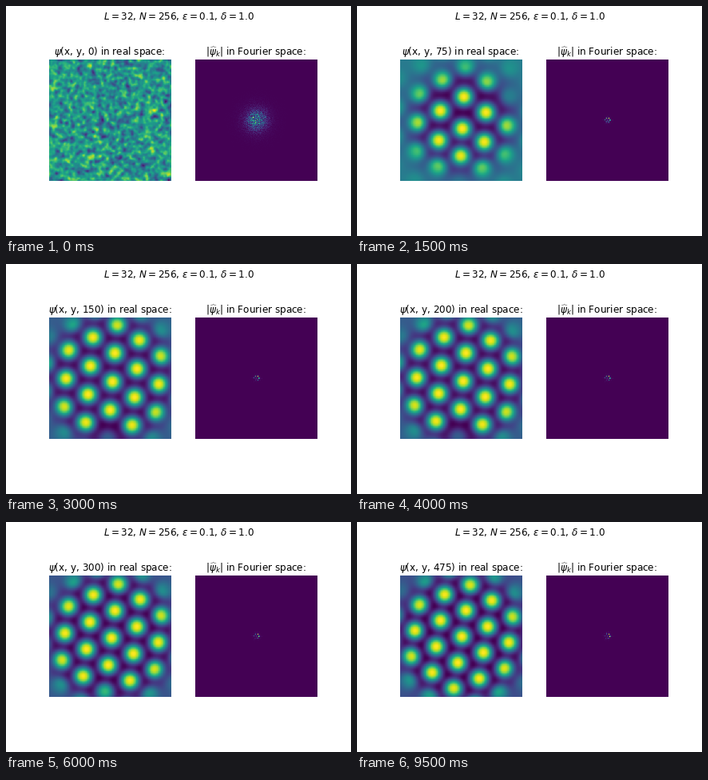
A matplotlib script for the animation above (10000 ms loop, 432x288 px).

```python
import numpy as np
import matplotlib.pyplot as plt
from matplotlib.animation import FuncAnimation

N, FRAMES, INTERVAL, STEP = 256, 20, 500, 25
LEFT, TOP, SIDE = 54.0, 67.0, 152.2          # real-space panel in stage pixels
SPOT_WIDTH = 12.2

grid = (np.arange(N) + 0.5) * SIDE / N
X, Y = np.meshgrid(LEFT + grid, TOP + grid)
R = np.hypot(X - 131, Y - 145)
mode = np.fft.fftfreq(N, 1 / N)
Q = np.hypot(*np.meshgrid(mode, mode))
taper = np.sqrt(np.sin(np.pi * grid / SIDE))
window = np.outer(taper, taper)

# The crystal passes four stages: linear growth, saturation, ordering, rest.
STAGE_TIMES = [50, 100, 150, 250, 375, 475]
STAGES = [0, 1, 2, 2.33, 2.9, 3]
ORIGIN = [(131.5, 148.5), (131.5, 148.5), (133, 147.5), (131, 144)]
A = [(29.5, -17.5), (29.5, -17.5), (30.5, -16), (32, -12.5)]
B = [(27.5, 19.5), (27.5, 19.5), (27.5, 19.5), (26.8, 20)]
LAG = [2.8, 2.8, .3, 0]                      # inner rings sit lower at first
REACH = [55, 79, 82, 82]                     # radius of the crystal
EDGE = [3, 10, 12, 12]                       # steepness of its rim
LEVEL = [.55, .4, .37, .37]                  # mean level taken off the spots
BIRTHS = {(2, 0): (50, 150), (-2, 2): (200, 375)}


def ring(i, j):
    return max(abs(i), abs(j), abs(i + j))


SITES = [(i, j) for i in range(-3, 4) for j in range(-3, 4) if ring(i, j) <= 3]


def at_stage(keys, stage):
    keys = np.asarray(keys, float)
    k = min(int(stage), len(keys) - 2)
    return keys[k] + (stage - k) * (keys[k + 1] - keys[k])


def smoothstep(t, start, end):
    p = np.clip((t - start) / (end - start), 0, 1)
    return p * p * (3 - 2 * p)


def spot(x, y):
    return np.exp(-(((X - x) ** 2 + (Y - y) ** 2) / SPOT_WIDTH ** 2) ** 1.2)


def crystal(t):
    stage = np.interp(t, STAGE_TIMES, STAGES)
    origin, a, b, lag, reach, edge, level = (
        at_stage(keys, stage) for keys in (ORIGIN, A, B, LAG, REACH, EDGE, LEVEL))
    u = np.full((N, N), -level)
    for i, j in SITES:
        x, y = origin + i * a + j * b
        birth = BIRTHS.get((i, j))
        strength = .35 + .65 * smoothstep(t, *birth) if birth else 1
        u += strength * spot(x, y + lag * max(2 - ring(i, j), 0))
    return u / (1 + (R / reach) ** edge)


def filtered(noise_hat, response):
    u = np.fft.ifft2(noise_hat * response).real
    return u / u.std()


noise_hat = np.fft.fft2(np.random.default_rng(7).standard_normal((N, N)))
start = filtered(noise_hat, 1 / (1 + (Q / 19) ** 4))
ripples = filtered(noise_hat, np.exp(-25 * (1 - (Q / 5.1) ** 2) ** 2))
ripples *= np.exp(-(R / 75) ** 2)


def field(t):
    if t == 0:
        return start
    return crystal(t) + np.interp(t, [25, 50, 75], [.18, .05, 0]) * ripples


def spectrum(u, weight):
    return np.abs(np.fft.fftshift(np.fft.fft2((u - u.mean()) * weight)))


plt.rcParams.update({"font.family": "DejaVu Sans", "font.size": 10})
fig, (real_ax, fourier_ax) = plt.subplots(1, 2, figsize=(6, 4), dpi=72)
fig.subplots_adjust(left=.125, right=.9, bottom=.125, top=.88, wspace=.2)
fig.suptitle(r"$L=32$, $N=256$, $\varepsilon=0.1$, $\delta=1.0$", fontsize=12)
images = [ax.imshow(np.zeros((N, N)), cmap="viridis", interpolation="nearest")
          for ax in (real_ax, fourier_ax)]
for ax in (real_ax, fourier_ax):
    ax.axis("off")
title = real_ax.set_title("", fontsize=12)
fourier_ax.set_title(r"$|\widehat{\psi}_k|$ in Fourier space:", fontsize=12)


def update(i):
    t = i * STEP
    u = field(t)
    for image, data in zip(images, (u, spectrum(u, window if t else 1))):
        image.set_data(data)
        image.set_clim(data.min(), data.max())
    title.set_text(rf"$\psi$(x, y, {t}) in real space:")
    return (*images, title)


anim = FuncAnimation(fig, update, frames=FRAMES, interval=INTERVAL,
                     init_func=lambda: update(0), repeat=True, repeat_delay=0)
plt.show()
```
